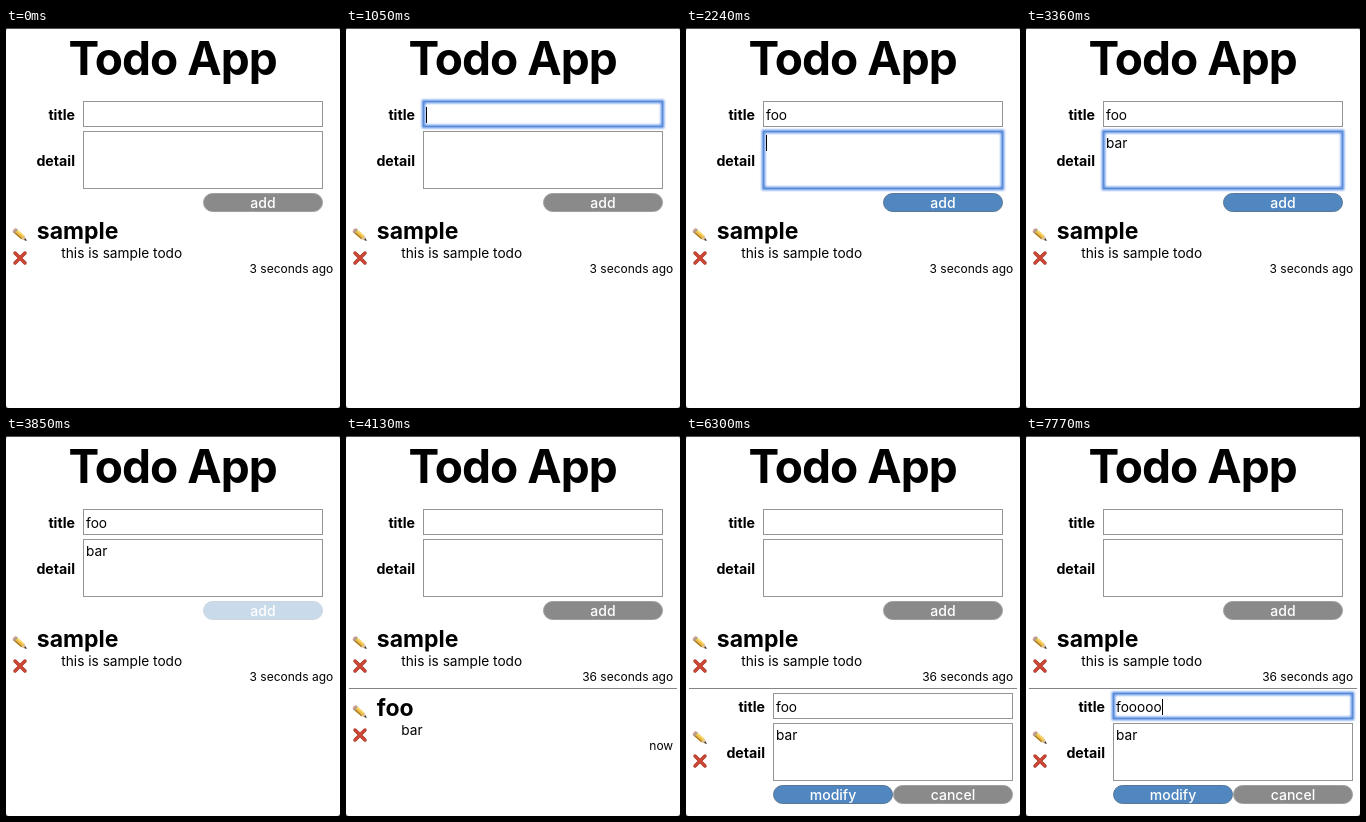
An HTML page for the animation above (8000 ms loop, 334 px wide and 380 px high).

```html
<!DOCTYPE html>
<html lang="en">
<head>
<meta charset="utf-8">
<title>Todo App</title>
<style>
  html, body { margin: 0; width: 100%; height: 100%; overflow: hidden; background: #fff; }
  svg { display: block; width: 100%; height: 100%; }
  text {
    font: 13.7px Inter, "Open Sans", sans-serif;
    font-optical-sizing: none;
    white-space: pre;
  }
  .heading { font-size: 46px; font-weight: 700; letter-spacing: -.02em; }
  .name { font-size: 23px; font-weight: 700; }
  .label { font-size: 14.2px; font-weight: 700; text-anchor: end; }
  .age { font-size: 12px; text-anchor: end; }
  .button text { font-size: 14px; font-weight: 500; fill: #fff; text-anchor: middle; }
  .button rect { fill: #8a8a8a; stroke: #a0a0a0; }
  .button.active rect { fill: #5087c0; stroke: #5a7896; }
  .field { fill: #fff; stroke: #949494; }
  .glow { fill: none; stroke: #5b90e6; stroke-width: 3.5; filter: blur(1px); }
  .edge { fill: none; stroke: #5c8ad0; }
</style>
</head>
<body>
<svg viewBox="0 0 334 380" preserveAspectRatio="none">
  <defs>
    <g id="pencil">
      <g transform="rotate(41) scale(1.06 1.15)">
        <path d="M-6.5-2.1H3.6V2.1H-6.5z" fill="#eebc42"/>
        <path d="M-6.5-2.1H3.6V-.8H-6.5z" fill="#f8d873"/>
        <path d="M-6.5 .9H3.6V2.1H-6.5z" fill="#a97a28"/>
        <path d="M-6-2.1H-7.3Q-8.6 0-7.3 2.1H-6z" fill="#d99a92"/>
        <path d="M-6.2-2.1h1.4v4.2h-1.4z" fill="#a0a098"/>
        <path d="M3.6-2.1 8.4 0 3.6 2.1z" fill="#dcbd92"/>
        <path d="M6-1 8.6 0 6 1z" fill="#333"/>
      </g>
    </g>
    <g id="cross" fill="none" stroke-linecap="round">
      <path d="M-5-5 5 5M5-5-5 5" stroke="#a83226" stroke-width="3.4"/>
      <path d="M-5-5 5 5M5-5-5 5" stroke="#d04a35" stroke-width="1.8"/>
    </g>
  </defs>
  <rect width="334" height="380" fill="#fff"/>
  <g id="app"></g>
  <path d="M0 .5H334" stroke="#555"/>
  <path d="M0 0H3Q0 0 0 3zM334 0v3Q334 0 331 0zM0 380v-3Q0 380 3 380zM334 380h-3Q334 380 334 377z" fill="#444"/>
</svg>
<script>
const LOOP = 8000;
const app = document.getElementById("app");

const start = {
  title: "", detail: "", focus: "", caret: true, press: 1,
  age: "3 seconds ago", added: false, editing: false, editTitle: "foo", pencil: 1
};

// Each step overrides part of the state from its time on.
const steps = [
  [1050, { focus: "title" }],
  [1540, { title: "f" }],
  [1680, { title: "fo" }],
  [1890, { title: "foo" }],
  [2240, { focus: "detail" }],
  [2590, { detail: "b" }],
  [2730, { detail: "ba" }],
  [2870, { detail: "bar" }],
  [3360, { caret: false }],
  [3850, { focus: "", caret: true, press: .3 }],
  [4060, { title: "", detail: "", added: true, age: "36 seconds ago", press: .65 }],
  [4130, { press: 1 }],
  [5810, { pencil: .2 }],
  [5950, { editing: true, pencil: .4 }],
  [6020, { pencil: .75 }],
  [6090, { pencil: 1 }],
  [6930, { focus: "editTitle" }],
  [7350, { editTitle: "fooo" }],
  [7630, { editTitle: "foooo" }],
  [7770, { editTitle: "fooooo" }]
];

const text = (x, y, value, kind = "") => `<text class="${kind}" x="${x}" y="${y}">${value}</text>`;
const icon = (id, y, opacity = 1) => `<use href="#${id}" x="14" y="${y}" opacity="${opacity}"/>`;

function field(y, height, value, focused, caret) {
  const box = kind => `<rect class="${kind}" x="77.5" y="${y + .5}" width="239" height="${height - 1}"/>`;
  const baseline = height < 30 ? y + 19 : y + 17;
  return box("field") + (focused ? box("glow") + box("edge") : "") +
    text(80, baseline, value, focused ? "typed" : "") +
    (focused && caret ? `<rect class="caret" x="80" y="${baseline - 13}" width="1" height="16"/>` : "");
}

function button(x, label, active, opacity = 1) {
  return `<g class="button ${active ? "active" : ""}" opacity="${opacity}">
    <rect x="${x + .5}" y="165.5" width="119" height="18" rx="9"/>${text(x + 60, 180, label)}</g>`;
}

function form(x, y, title, detail, focus, caret, buttons) {
  return `<g transform="translate(${x} ${y})">` +
    text(69, 92, "title", "label") + text(69, 138, "detail", "label") +
    field(73, 26, title, focus === "title", caret) +
    field(103, 58, detail, focus === "detail", caret) + buttons + "</g>";
}

function todo(y, name, detail, age, opacity) {
  return `<g transform="translate(0 ${y})">` +
    icon("pencil", 207, opacity) + icon("cross", 230) +
    text(30.8, 211, name, "name") + text(55.3, 230, detail) +
    text(327.2, 245, age, "age") + "</g>";
}

function view(s) {
  let out = text(62.5, 47, "Todo App", "heading") +
    form(0, 0, s.title, s.detail, s.focus, s.caret, button(197, "add", s.title, s.press)) +
    todo(0, "sample", "this is sample todo", s.age);
  if (s.added) out += `<path d="M3 252.5H331" stroke="#858585"/>`;
  if (s.editing) {
    out += icon("pencil", 302, s.pencil) + icon("cross", 325) +
      form(10, 184, s.editTitle, "bar", s.focus === "editTitle" ? "title" : "", s.caret,
        button(77, "modify", true) + button(197, "cancel", false));
  } else if (s.added) {
    out += todo(69, "foo", "bar", "now", s.pencil);
  }
  return out;
}

let shown = -1;
function render(now) {
  const time = now % LOOP;
  const count = steps.filter(([at]) => at <= time).length;
  if (count !== shown) {
    shown = count;
    app.innerHTML = view(Object.assign({}, start, ...steps.slice(0, count).map(step => step[1])));
    const caret = app.querySelector(".caret");
    if (caret) {
      const width = app.querySelector(".typed").getComputedTextLength();
      caret.setAttribute("x", 80 + Math.round(width));
    }
  }
  requestAnimationFrame(render);
}
render(performance.now());
</script>
</body>
</html>
```
